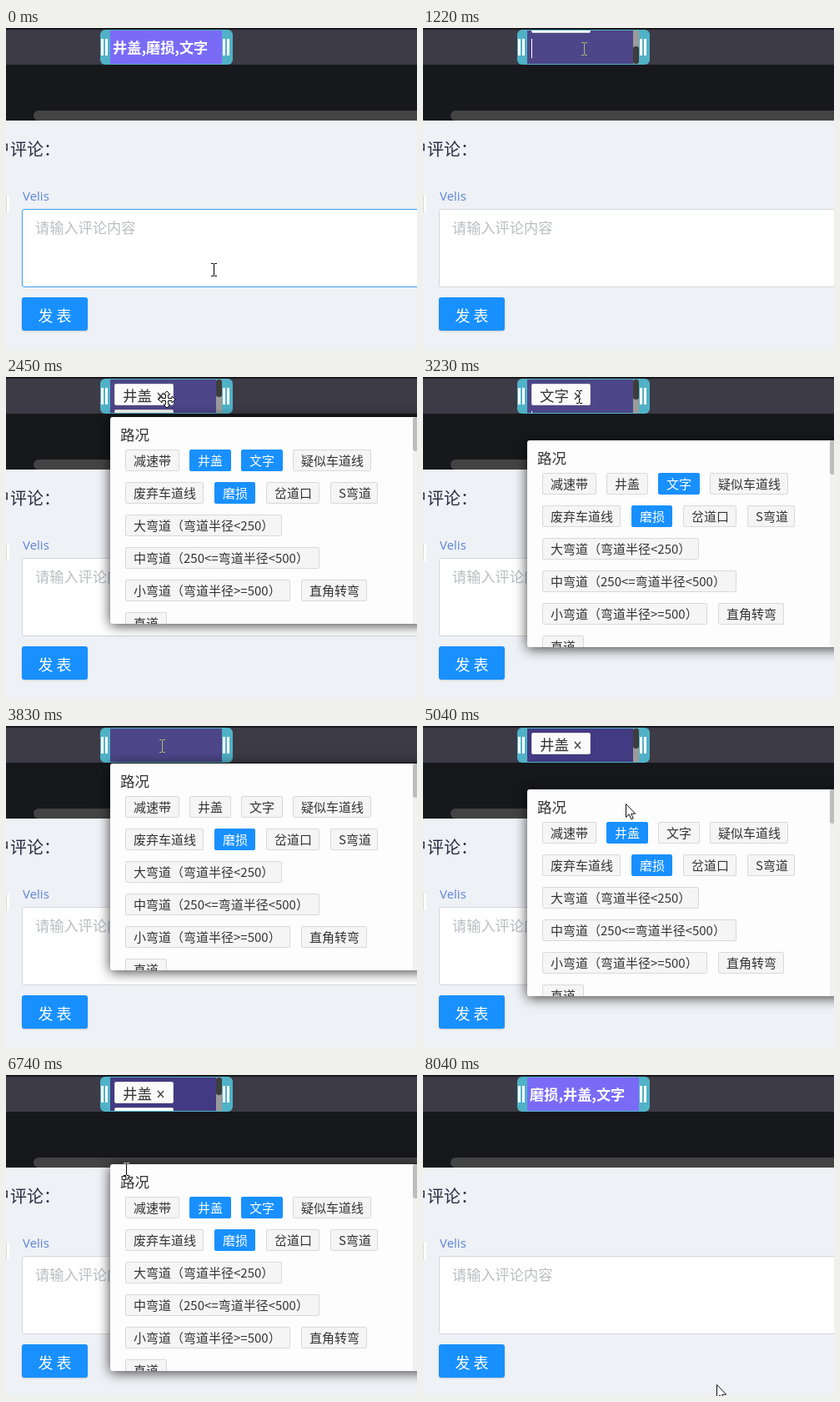
These frames come from a looping animation (493 by 385 pixels, 8.94 s). An HTML page:

```html
<!DOCTYPE html>
<html lang="zh-CN">
<head>
<meta charset="utf-8">
<title>标注编辑</title>
<style>
html, body { margin: 0; width: 100%; height: 100%; overflow: hidden; }
body { font-family: "Noto Sans CJK SC", "Noto Sans CJK", "Noto Sans", sans-serif; color: #333; }
#stage { position: absolute; left: 0; top: 0; width: 493px; height: 385px; overflow: hidden; background: #eef1f5; }
#stage div, #stage svg { position: absolute; box-sizing: border-box; white-space: nowrap; }
#dark { left: 0; top: 0; width: 493px; height: 111px; background: #17181c; }
#band { left: 0; top: 2px; width: 493px; height: 42px; background: #3c3b46; }
#hbar { left: 33px; top: 99px; width: 480px; height: 12px; border-radius: 6px; background: #434343; }
#seg { left: 113px; top: 2px; width: 159px; height: 42px; border-radius: 6px; background: #50b2c7; }
#label { left: 12px; top: 1px; width: 134px; height: 40px; padding-left: 3px; background: #7a6bf7; color: #fff; font-size: 17.2px; font-weight: 900; line-height: 39px; }
.grip { top: 11px; width: 8px; height: 20px; border: solid #fff; border-width: 0 3px; }
#editor { left: 12px; top: 1px; width: 134px; height: 40px; overflow: hidden; }
#rows { left: 5px; top: 5px; }
.tag { width: 71px; height: 26px; padding-left: 9px; border: 1px solid #d9d9d9; border-radius: 2px; background: #fafafa; font-size: 17.5px; line-height: 25px; }
.tag svg { left: 50px; top: 9px; }
#caret { left: 0; width: 1px; height: 23px; background: #fff; }
#track { left: 127px; top: 0; width: 7px; height: 40px; background: #9b9b9b; }
#thumb { left: 0; width: 7px; border-radius: 3px; background: #3d3d3d; }
#title { left: -35px; top: 131px; font-size: 20px; line-height: 28px; color: #2a2a40; }
#user { left: 20px; top: 191px; font: 15px/21px "Open Sans", "Noto Sans", sans-serif; color: #5b84d6; }
#face { left: 0; top: 201px; width: 4px; height: 20px; background: #fff; border-left: 1px solid #d5d9df; }
#area { left: 19px; top: 217px; width: 500px; height: 94px; padding-left: 15px; border: 1px solid #d3d6da; border-radius: 3px; background: #fff; color: #bbbdc2; font-size: 17.2px; line-height: 42px; }
#send { left: 19px; top: 323px; width: 79px; height: 40px; border-radius: 3px; background: #1890ff; color: #fff; font-size: 18px; line-height: 42px; text-align: center; box-shadow: 0 1px 2px rgba(0,0,0,.15); }
#drop { left: 125px; width: 390px; height: 248px; border-radius: 3px; background: #fdfdfd; box-shadow: 0 2px 15px rgba(0,0,0,.75); transform-origin: 0 0; }
#list { inset: 0; overflow: hidden; }
#head { left: 12px; top: 8px; font-size: 17.5px; line-height: 26px; }
.chip { height: 26px; border: 1px solid #d9d9d9; border-radius: 2px; background: #f5f5f5; font-size: 15px; line-height: 24px; padding-left: 9px; }
.chip.on { background: #1890ff; border-color: #1890ff; color: #fff; font-weight: 500; }
#vtrack { left: 363px; top: 0; width: 8px; height: 248px; background: #f1f1f1; }
#vthumb { left: 363px; top: 0; width: 8px; height: 41px; border-radius: 3px; background: #bdbdbd; }
#halo { width: 30px; height: 30px; border-radius: 50%; background: rgba(255,225,60,.4); }
#stage svg.cur { left: 0; top: 0; overflow: visible; }
#beam { mix-blend-mode: difference; }
</style>
</head>
<body>
<div id="stage">
  <div id="dark"></div><div id="band"></div><div id="hbar"></div>
  <div id="seg">
    <div id="label"></div>
    <div class="grip" style="left:1px"></div><div class="grip" style="left:147px"></div>
    <div id="editor">
      <div id="rows"></div>
      <div id="track"><div id="thumb"></div></div>
    </div>
  </div>
  <div id="title">用户评论：</div>
  <div id="face"></div>
  <div id="user">Velis</div>
  <div id="area">请输入评论内容</div>
  <div id="send">发 表</div>
  <div id="drop"><div id="list"><div id="head">路况</div><div id="vtrack"></div><div id="vthumb"></div></div></div>
  <div id="halo"></div>
  <svg id="beam" class="cur" width="1" height="1"><path d="M-3-7.500h3M1-7.500h3M-3 7.500h3M1 7.500h3M.5-7V7" fill="none" stroke="#fff"/></svg>
  <svg id="arrow" class="cur" width="1" height="1"><path d="M.5.5v16l3.700-3.500 2.600 5.800 2.400-1-2.500-5.600h5z" fill="#fff" stroke="#111"/></svg>
  <svg id="move" class="cur" width="1" height="1"><path d="M0-10l4 4H1.500v4.500H6V-4l4 4-4 4V1.500H1.500V6H4l-4 4-4-4h2.500V1.500H-6V4l-4-4 4-4v2.500h4.500V-6H-4z" fill="#fff" stroke="#111"/></svg>
</div>
<script>
const LOOP = 8940, ROW = 31;
const $ = id => document.getElementById(id);
const show = (el, on) => { el.style.display = on ? '' : 'none'; };
const add = (parent, cls, html) => {
  const el = document.createElement('div');
  el.className = cls;
  el.innerHTML = html;
  parent.appendChild(el);
  return el;
};

// chips by row: text, left, width
const chips = [
  [['减速带', 18, 65], ['井盖', 95, 50], ['文字', 157, 50], ['疑似车道线', 219, 94]],
  [['废弃车道线', 18, 94], ['磨损', 125, 49], ['岔道口', 187, 64], ['S弯道', 264, 57]],
  [['大弯道（弯道半径&lt;250）', 18, 188]],
  [['中弯道（250&lt;=弯道半径&lt;500）', 18, 233]],
  [['小弯道（弯道半径&gt;=500）', 18, 198], ['直角转弯', 229, 79]],
  [['直道', 18, 50]]
].flatMap((row, i) => row.map(([text, x, w]) => {
  const el = add($('list'), 'chip', text);
  el.style.cssText = `left:${x}px;top:${39 + 39 * i}px;width:${w}px`;
  return { el, text };
}));

const cross = '<svg width="10" height="10"><path d="M1 1l7 8M8 1l-7 8" stroke="#444" stroke-width="1.4"/></svg>';
const tags = ['井盖', '磨损', '文字'].map(text => ({ text, el: add($('rows'), 'tag', text + cross) }));
const caret = add($('rows'), '', '');
caret.id = 'caret';

// editing phases: start, tags, scroll offset, list top
const phases = [
  [1220, ['井盖', '磨损', '文字'], 90, 48],
  [3030, ['磨损', '文字'], ROW, 76],
  [3730, ['磨损'], ROW, 45],
  [4630, ['磨损', '井盖'], ROW, 76],
  [5740, ['磨损', '井盖', '文字'], ROW, 107]
];
const CLOSE = 7230;

// pointer moves: start, end, x, y, shape on arrival
const moves = [
  [0, 0, 249, 290, 'beam'], [200, 520, 193, 25, 'beam'],
  [2230, 2430, 193, 27, 'move'], [2530, 2630, 187, 24, 'beam'],
  [3930, 4330, 243, 93, 'arrow'], [5340, 5640, 307, 127, 'arrow'],
  [5840, 6040, 444, 237, 'arrow'], [6240, 6740, 144, 113, 'beam'],
  [6830, 6930, 85, 104, 'arrow'], [7530, 8040, 352, 371, 'arrow']
];
const clicks = [520, 920, 2930, 3530, 4430, 5640, 7130];

const clamp = v => Math.min(1, Math.max(0, v));
const smooth = v => v * v * (3 - 2 * v);
const stepped = (t, a, b) => {
  const n = Math.max(1, Math.round((b - a) / 100));
  return clamp(Math.floor((t - a) / (b - a) * n + 1e-6) / n);
};

function pointer(t) {
  let [, , x, y, shape] = moves[0];
  for (const [a, b, nx, ny, next] of moves.slice(1)) {
    if (t < a) break;
    const k = smooth(stepped(t, a, b));
    x += (nx - x) * k;
    y += (ny - y) * k;
    if (k >= 1) shape = next;
  }
  return { x, y, shape };
}

function drawEditor(t, [start, names, offset]) {
  const first = start === 1220;
  const scroll = first ? offset * (1 - smooth(stepped(t, 2130, 2430))) : offset;
  $('rows').style.transform = `translateY(${-scroll}px)`;
  tags.forEach(({ text, el }) => {
    const i = names.indexOf(text);
    show(el, i >= 0);
    el.style.top = i * ROW + 'px';
  });
  caret.style.top = names.length * ROW + 2 + 'px';
  show(caret, (t - 1220) % 1000 < 500);
  show($('track'), names.length > 1);
  $('thumb').style.height = (names.length > 2 ? 21 : 24) + 'px';
  $('thumb').style.top = (first ? 19 * scroll / 90 : 0) + 'px';
  $('editor').style.background = t < 4630 ? '#4d4688' : '#423a82';
}

function drawList(t, [, names, , top]) {
  const k = smooth(clamp((t - 1320) / 200));
  const drop = $('drop');
  show(drop, t >= 1320);
  drop.style.top = top + 'px';
  drop.style.opacity = k;
  drop.style.transform = k < 1 ? `scaleY(${0.8 + 0.2 * k})` : '';
  chips.forEach(({ text, el }) => el.classList.toggle('on', names.includes(text)));
}

function render(t) {
  const editing = t >= 1220 && t < CLOSE;
  $('area').style.borderColor = t < 520 ? '#3d9ff0' : '#d3d6da';
  $('label').textContent = t < CLOSE ? '井盖,磨损,文字' : '磨损,井盖,文字';
  show($('editor'), editing);
  show($('drop'), editing);
  if (editing) {
    const phase = phases.filter(p => p[0] <= t).pop();
    drawEditor(t, phase);
    drawList(t, phase);
  }
  const { x, y, shape } = pointer(t);
  for (const id of ['beam', 'arrow', 'move']) {
    show($(id), id === shape);
    $(id).style.transform = `translate(${Math.round(x)}px, ${Math.round(y)}px)`;
  }
  show($('halo'), clicks.some(c => t >= c && t < c + 100));
  $('halo').style.transform = `translate(${x - 15}px, ${y - 15}px)`;
}

const origin = performance.now();
function tick() {
  render((performance.now() - origin) % LOOP);
  requestAnimationFrame(tick);
}
tick();
</script>
</body>
</html>
```
